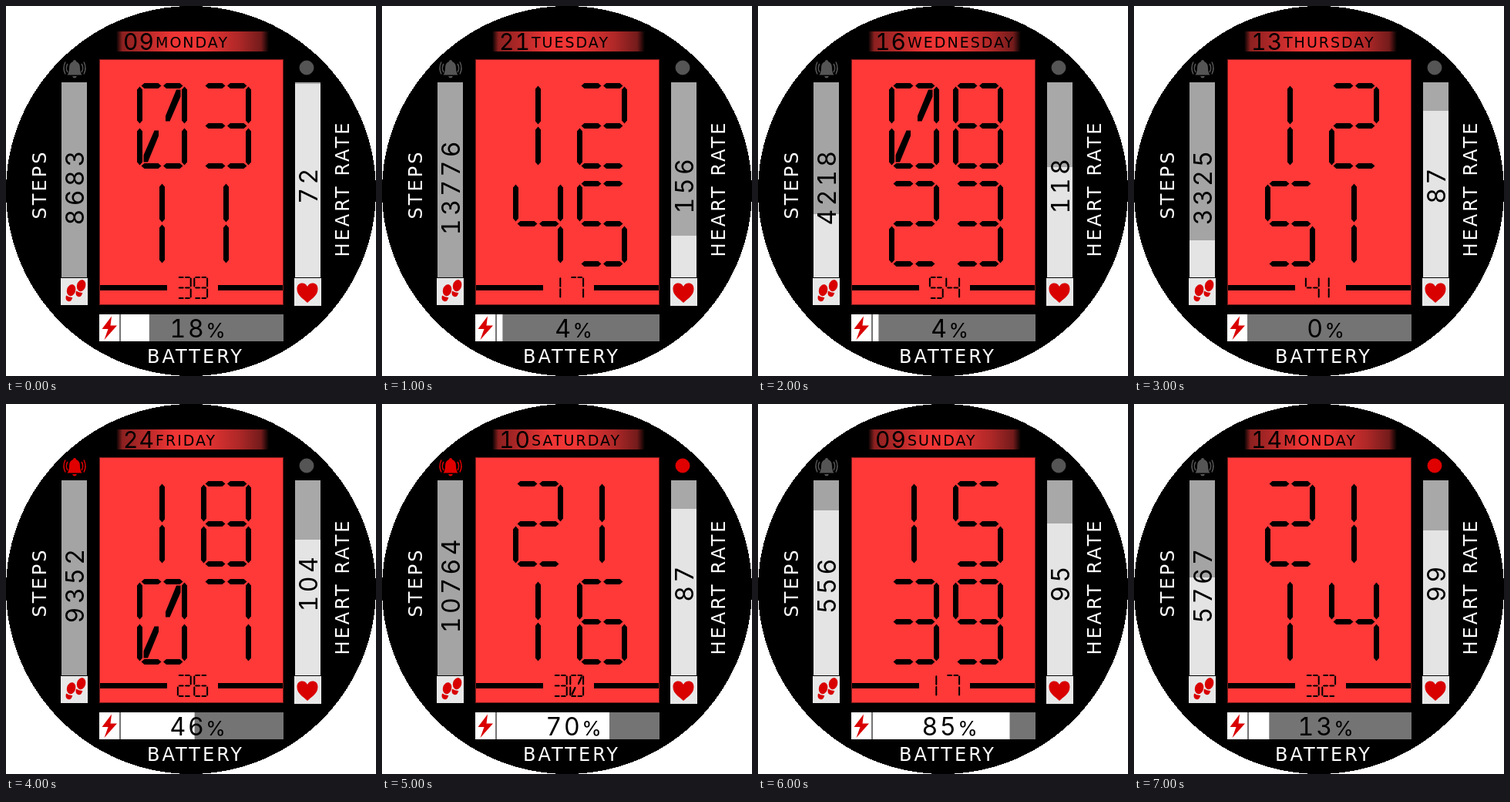
Recreate the animation shown at these times as an HTML page. Size 480x480 px, loop 8 s.

```html
<!DOCTYPE html>
<html lang="en">
<head>
<meta charset="utf-8">
<title>Digital watch face</title>
<style>
  html, body { margin: 0; width: 100%; height: 100%; overflow: hidden; background: #fff; }
  svg { display: block; width: 100vw; height: 100vh; }
  text { font-family: "DejaVu Sans", sans-serif; }
  .label { font-size: 24px; letter-spacing: 3px; fill: #fff; text-anchor: middle; }
  .num { font: 400 32px Inter, "DejaVu Sans", sans-serif; font-variant-numeric: tabular-nums;
         letter-spacing: 4.5px; text-anchor: middle; }
  #level { letter-spacing: 2.6px; }
  #date { font-size: 30px; letter-spacing: 1px; text-anchor: start; }
  #day { font-size: 19px; letter-spacing: 2px; }
  .icon { fill: #555; stroke: #555; }
  .icon.on { fill: #e00000; stroke: #e00000; }
</style>
</head>
<body>
<svg viewBox="0 0 480 480">
  <defs>
    <linearGradient id="glow">
      <stop offset="0" stop-color="#000"/>
      <stop offset=".04" stop-color="#8c2020"/>
      <stop offset=".15" stop-color="#a82626"/>
      <stop offset=".38" stop-color="#f03535"/>
      <stop offset=".55" stop-color="#f03535"/>
      <stop offset=".8" stop-color="#b02828"/>
      <stop offset=".95" stop-color="#741b1b"/>
      <stop offset="1" stop-color="#000"/>
    </linearGradient>
  </defs>
  <circle cx="240" cy="240" r="240" shape-rendering="crispEdges"/>

  <rect x="143" y="33" width="198" height="26" fill="url(#glow)"/>
  <text id="date" class="num" x="152" y="57"></text>
  <text id="day" x="194" y="53.5"></text>

  <rect x="121.500" y="69.500" width="238" height="318" fill="#ff3838" stroke="#7d1b1b"/>
  <path d="M122 362h87v7h-87zM275 362h84v7h-84z"/>
  <path id="h1" transform="translate(202.5 155.5)"/>
  <path id="h2" transform="translate(285.5 155.5)"/>
  <path id="m1" transform="translate(202.5 282.5)"/>
  <path id="m2" transform="translate(285.5 282.5)"/>
  <path id="s1" transform="translate(231.3 365.5) scale(.29 .26)"/>
  <path id="s2" transform="translate(252.7 365.5) scale(.29 .26)"/>

  <rect x="72" y="99" width="33" height="253" fill="#a4a4a4"/>
  <rect id="stepBar" x="72" width="33" fill="#e4e4e4"/>
  <text id="steps" class="num" transform="translate(101 234) rotate(-90)"></text>
  <rect x="71" y="353" width="35" height="35" fill="#e8e8e8"/>
  <g fill="#d90000">
    <g id="foot" transform="translate(83.500 372.500) rotate(16)">
      <ellipse cy="-4" rx="5.600" ry="7.600"/>
      <path d="M-4.400 4.500Q0 6 4.200 4.500Q4.500 11 0 11Q-4.500 11-4.400 4.500z"/>
    </g>
    <use href="#foot" x="13" y="-6"/>
  </g>

  <rect x="375" y="99" width="33" height="253" fill="#a8a8a8"/>
  <rect id="pulseBar" x="375" width="33" fill="#e4e4e4"/>
  <text id="pulse" class="num" transform="translate(404 231.5) rotate(-90)"></text>
  <rect x="374" y="353" width="35" height="36" fill="#e8e8e8"/>
  <path d="M391 385C386 380 377.500 376 377.500 367C377.500 358 388 357.500 391 364C394 357.500 404.500 358 404.500 367C404.500 376 396 380 391 385z" fill="#d90000"/>

  <rect x="121" y="400" width="239" height="35" fill="#747474"/>
  <rect x="121" y="400" width="26" height="35" fill="#fff"/>
  <path d="M137 402.500L124.500 419H132.500L127.500 433L144 414.500H135.500z" fill="#d90000"/>
  <rect id="levelBar" x="149" y="400" height="35" fill="#fff"/>
  <text class="num" id="level" x="250" y="429.5"><tspan id="percent"></tspan><tspan font-size="26">%</tspan></text>

  <g id="bell" class="icon">
    <path d="M89 70Q91 70 91 72Q96 74 96 80Q96 86 98.500 89.500H79.500Q82 86 82 80Q82 74 87 72Q87 70 89 70zM86 91H92Q91 93.500 89 93.500Q87 93.500 86 91z" stroke="none"/>
    <path d="M80 75Q76.500 80.500 80 86M77 72.500Q73 80.500 77 88.500M98 75Q101.500 80.500 98 86M101 72.500Q105 80.500 101 88.500" fill="none" stroke-width="1.500"/>
  </g>
  <circle id="link" class="icon" cx="390" cy="80" r="9" stroke="none"/>

  <text class="label" x="246" y="462.5">BATTERY</text>
  <text class="label" transform="translate(52 231.5) rotate(-90)">STEPS</text>
  <text class="label" transform="translate(445 237) rotate(-90)">HEART RATE</text>
</svg>
<script>
  const $ = id => document.getElementById(id);

  // Pointed display segments, relative to the digit's centre
  const vert = (x, y1, y2) =>
    `M${x} ${y1}l3.5 4V${y2 - 4}l-3.5 4l-3.5-4V${y1 + 4}z`;
  const dash = (x1, x2, y) =>
    `M${x1} ${y}l4-3.5H${x2 - 4}l4 3.5l-4 3.5H${x1 + 4}z`;
  const bar = y => dash(-27, -1, y) + dash(1.5, 27, y);

  const segments = {
    a: bar(-52), g: bar(0), d: bar(52),
    f: vert(-29, -51, -3), b: vert(29, -51, -3),
    e: vert(-29, 3, 51), c: vert(29, 3, 51),
    i: vert(0, -52, -2), j: vert(0, 1, 51),
    k: 'M24-47V-38L10-6H4.500V-13L18.500-47zM-24 47V38L-10 6H-4.500V13L-18.500 47z'
  };
  const digits = ['abcdefk', 'ij', 'abged', 'abgcd', 'fgbc',
                  'afgcd', 'afgecd', 'abc', 'abcdefg', 'abcdfg'];
  const glyph = n => [...digits[n]].map(s => segments[s]).join('');

  // date, day, hhmmss, steps, top of step bar, pulse, battery, alarm, link
  const states = [
    ['09', 'MONDAY', '031139', 8683, 352, 72, 18, 0, 0],
    ['21', 'TUESDAY', '124517', 13776, 352, 156, 4, 0, 0],
    ['16', 'WEDNESDAY', '082354', 4218, 270, 118, 4, 0, 0],
    ['13', 'THURSDAY', '125141', 3325, 304, 87, 0, 0, 0],
    ['24', 'FRIDAY', '180726', 9352, 352, 104, 46, 1, 0],
    ['10', 'SATURDAY', '211630', 10764, 352, 87, 70, 1, 1],
    ['09', 'SUNDAY', '153917', 556, 138, 95, 85, 0, 0],
    ['14', 'MONDAY', '211432', 5767, 225, 99, 13, 0, 1]
  ];
  const slots = ['h1', 'h2', 'm1', 'm2', 's1', 's2'];

  function fillFrom(id, top) {
    $(id).setAttribute('y', top);
    $(id).setAttribute('height', 352 - top);
  }

  function show([date, day, time, steps, stepTop, pulse, level, alarm, link]) {
    Object.entries({ date, day, steps, pulse, percent: level })
      .forEach(([id, value]) => $(id).textContent = value);
    slots.forEach((id, i) => $(id).setAttribute('d', glyph(time[i])));
    fillFrom('stepBar', stepTop);
    fillFrom('pulseBar', Math.max(99, Math.round(136 + 2.348 * (pulse - 87))));
    $('levelBar').setAttribute('width', Math.max(0, 2.1 * level - 1));
    $('bell').classList.toggle('on', !!alarm);
    $('link').classList.toggle('on', !!link);
  }

  let current = -1;
  function tick() {
    const next = Math.floor(performance.now() / 1000) % states.length;
    if (next !== current) show(states[current = next]);
    requestAnimationFrame(tick);
  }
  tick();
</script>
</body>
</html>
```
